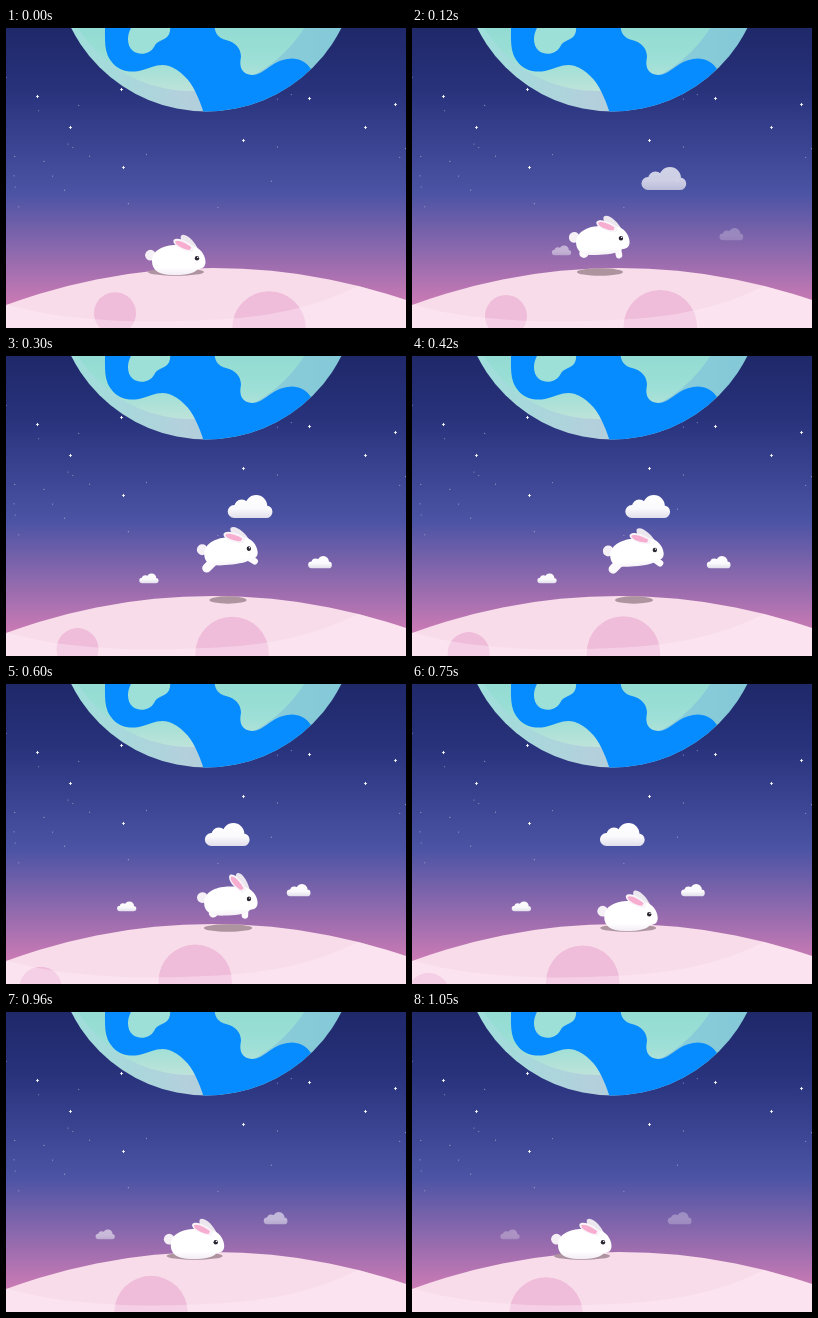
Animation, 400 px wide and 300 px high, one loop 1.08 s. Source, as an HTML page with a canvas:

```html
<!DOCTYPE html>
<html lang="en">
<head>
<meta charset="utf-8">
<title>Moon hop</title>
<style>
html, body { margin: 0; width: 100%; height: 100%; overflow: hidden; background: #1f2869; }
canvas { display: block; width: 400px; height: 300px; }
</style>
</head>
<body>
<canvas id="stage" width="400" height="300"></canvas>
<script>
const ctx = document.getElementById('stage').getContext('2d');
const LOOP = 1080, STEP = 30;

const CLOUDS = [
  { x: 253, y: 162, size: 1, delay: 30, fadeOut: 150 },
  { x: 150, y: 227.3, size: .43, delay: 60, fadeOut: 340 },
  { x: 319.5, y: 212.3, size: .53, delay: 90, fadeOut: 340 }
];
const BRIGHT = [[31, 68], [115, 61], [64, 99], [117, 139], [237, 112], [303, 70], [389, 76], [359, 99]];

const clamp = u => Math.max(0, Math.min(1, u));
const ease = u => (1 - Math.cos(Math.PI * clamp(u))) / 2;

function random(seed) {
  return () => (seed = seed * 16807 % 2147483647) / 2147483647;
}

function fade(x0, y0, x1, y1, ...stops) {
  const g = ctx.createLinearGradient(x0, y0, x1, y1);
  stops.forEach(([p, c]) => g.addColorStop(p, c));
  return g;
}

function oval(x, y, rx, ry, fill) {
  ctx.beginPath();
  ctx.ellipse(x, y, rx, ry, 0, 0, 7);
  ctx.fillStyle = fill;
  ctx.fill();
}

const disc = (x, y, r, fill) => oval(x, y, r, r, fill);

function shape(d, fill) {
  ctx.fillStyle = fill;
  ctx.fill(new Path2D(d));
}

function clipDisc(x, y, r) {
  ctx.beginPath();
  ctx.arc(x, y, r, 0, 7);
  ctx.clip();
}

function sky() {
  ctx.fillStyle = fade(0, 0, 0, 275, [0, '#1f2869'], [.22, '#28327b'], [.6, '#4b53a4'], [.78, '#8366ac'], [1, '#c97ab4']);
  ctx.fillRect(0, 0, 400, 300);
  const next = random(77);
  for (let i = 0; i < 28; i++) {
    disc(next() * 400, 30 + next() * 150, .6, 'rgba(255,255,255,.45)');
  }
  for (const [x, y] of BRIGHT) {
    oval(x + .5, y + .5, 1.7, .6, '#fff');
    oval(x + .5, y + .5, .6, 1.7, '#fff');
  }
}

function earth() {
  ctx.save();
  clipDisc(200.3, -67.5, 151);
  ctx.fillStyle = fade(66, 0, 335, 0, [0, '#9fdfdb'], [.45, '#b4cfdc'], [.75, '#8accd8'], [1, '#84c9d8']);
  ctx.fillRect(40, 0, 320, 90);
  disc(185, -70, 133, fade(0, 0, 0, 64, [0, '#93dcd3'], [.5, '#9cdfd6'], [1, '#bfe3d9']));
  shape('M99-2C99 12 98 24 105 33C111 42 122 45 133 43C146 40 152 35 163 38C174 42 184 52 189 63' +
    'C193 71 196 79 198 86L260 86L305 41C300 33 290 29 281 31C264 34 258 47 246 47' +
    'C235 46 233 38 235 29C235 20 229 14 220 12C212 10 209 5 208.5-2Z', '#068cff');
  shape('M126-2C120 8 121 18 127 23C134 28 144 26 148 19C151 12 158 13 162 8C165 4 164-2 164-2Z', '#9ce0d8');
  ctx.restore();
}

function moon(t) {
  const cx = 207, cy = 837;
  const crater = (angle, orbit, r) => {
    const a = angle - t * 2.281e-4;
    disc(cx + orbit * Math.sin(a), cy - orbit * Math.cos(a), r, '#efbcd9');
  };
  ctx.save();
  clipDisc(cx, cy, 597);
  ctx.fillStyle = '#f8dcea';
  ctx.fillRect(0, 235, 400, 65);
  crater(.1039, 540, 36.7);
  crater(-.1757, 560.5, 21);
  shape('M352 258C310 279 262 290 200 292C130 296 50 292 0 276L0 300L400 300L400 258Z', 'rgba(255,236,246,.38)');
  ctx.restore();
}

function cloud({ x, y, size, delay, fadeOut }, t) {
  const alpha = clamp((t - delay) / 120) * (1 - clamp((t - 810) / fadeOut));
  ctx.save();
  ctx.translate(x - 52 * ease((t - delay) / 1000), y);
  ctx.scale(size, size);
  ctx.globalAlpha = alpha;
  ctx.beginPath();
  for (const [bx, by, r] of [[-16, -6.5, 6.5], [-8.5, -11, 7.5], [6, -12, 11], [16, -6.3, 6.3]]) {
    ctx.moveTo(bx + r, by);
    ctx.arc(bx, by, r, 0, 7);
  }
  ctx.rect(-16, -10, 32, 10);
  ctx.fillStyle = fade(0, -23, 0, 0, [0, '#fff'], [.6, '#faf9fc'], [1, '#e0deea']);
  ctx.fill();
  ctx.restore();
}

function ear(x, y, angle, fill, inner) {
  ctx.save();
  ctx.translate(x, y);
  ctx.rotate(-angle);
  shape('M-2.5 2C-5.5-5-5.5-19 0-20C5.5-19 5.5-5 2.5 2Z', fill);
  if (inner) shape('M-1.5-1C-4-7-3.5-17-.3-18C3-17 3-7 1.5-1Z', inner);
  ctx.restore();
}

function limb(x0, y0, x1, y1, w) {
  ctx.beginPath();
  ctx.moveTo(x0, y0);
  ctx.lineTo(x1, y1);
  ctx.lineWidth = w;
  ctx.lineCap = 'round';
  ctx.strokeStyle = '#fcfafd';
  ctx.stroke();
}

function rabbit(t) {
  // One hop, then a slide back with the ground; ears flick up on the way down
  const lift = Math.sin(Math.PI * clamp(t / 690));
  const x = 170 + 52 * (ease(t / 300) - clamp((t - 600) / 450) ** 2);
  const lean = 1.12 + .06 * lift - .45 * Math.exp(-(((t - 600) / 90) ** 2));
  const low = 16 - 2.5 * lift;

  oval(x, 244, 28 - 9.5 * lift, 3.7, '#ad949f');
  ctx.save();
  ctx.translate(x, 231 - 36.5 * lift);
  ctx.rotate(-.09 * lift);
  ear(19, -9, lean * .67, '#ece6ee');
  disc(-25.5, -3.8, 5.4, '#f5f0f6');
  limb(-11, 5, -10 - 13 * lift, 10 + 5 * lift, 9);
  limb(17, 6, 10 + 16 * lift, 10 + 2 * lift + 5 * Math.sin(Math.PI * lift), 6.5);
  shape(`M-24 2C-24-9-12-14 0-14C6-14 10-13 16-13C24-12 29.5-4 29.5 3C29.5 8 26 10 22 10` +
    `C17 ${low} 5 ${low} -4 ${low}C-17 ${low} -24 11 -24 2Z`,
    fade(0, -14, 0, 16, [0, '#fff'], [.75, '#fff'], [1, '#f2edf4']));
  ear(15.5, -10, lean, '#f8f4f9', '#f7adcf');
  oval(21, -.8, 2.2, 2.3, '#29242f');
  disc(21.7, -1.6, .7, '#fff');
  ctx.restore();
}

function draw(now) {
  const t = Math.floor(now % LOOP / STEP) * STEP;
  sky();
  earth();
  CLOUDS.forEach(c => cloud(c, t));
  moon(t);
  rabbit(t);
}

let start = null;
function tick(now) {
  if (start === null) start = now;
  draw(now - start);
  requestAnimationFrame(tick);
}
draw(0);
requestAnimationFrame(tick);
</script>
</body>
</html>
```
